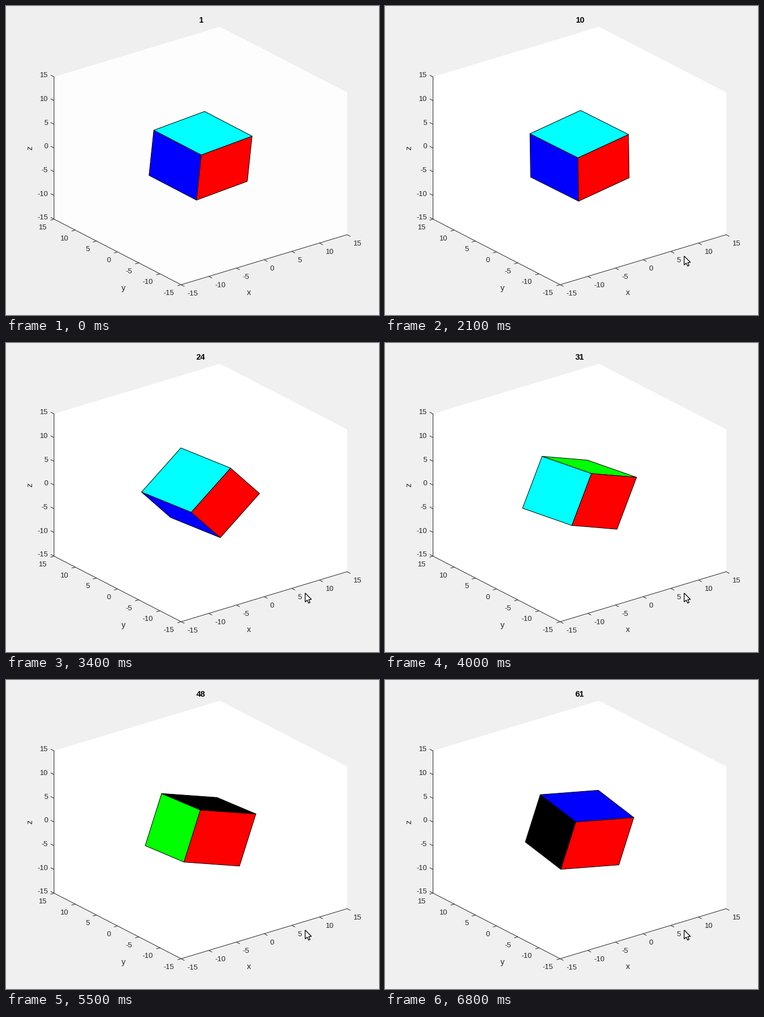
Animation, 672 px wide and 556 px high, one loop 6900 ms. Source, as a matplotlib script:

```python
from itertools import product

import numpy as np
import matplotlib.pyplot as plt
from matplotlib.animation import FuncAnimation
from matplotlib.patches import Polygon

W, H, DPI = 672, 556, 64
PX = 72 / DPI  # points per pixel
FRAMES, STEP = 69, 100
INK = "#262626"
LIM = 15

plt.rcParams["font.family"] = "Liberation Sans"

# Screen position of a 3D point: CENTER + PROJ @ point
CENTER = np.array([350.0, 269.0])
PROJ = np.array([[299, -229, 0], [-90, -118, -256]]) / (2 * LIM)
VIEW = np.cross(PROJ[1], PROJ[0])  # points towards the viewer
X, Y, Z = np.eye(3)

FACES = list(product(range(3), (-1, 1)))  # (axis, sign)
COLORS = "blue lime red yellow black cyan".split()


def project(p):
    return CENTER + PROJ @ p


def rotation(i, j, angle):
    """Turn axis i towards axis j."""
    m = np.eye(3)
    m[i, i] = m[j, j] = np.cos(angle)
    m[j, i] = np.sin(angle)
    m[i, j] = -m[j, i]
    return m


TILT = rotation(0, 1, 0.1) @ rotation(1, 2, 0.1)


def face_quad(rot, axis, sign, half):
    n, u, v = (rot[:, (axis + k) % 3] * half for k in range(3))
    turns = np.pi / 4 + np.arange(4) * np.pi / 2
    return [project(sign * n + np.sqrt(2) * (np.cos(t) * u + np.sin(t) * v))
            for t in turns]


fig = plt.figure(figsize=(W / DPI, H / DPI), dpi=DPI)
ax = fig.add_axes([0, 0, 1, 1])
ax.set_xlim(-0.5, W - 0.5)
ax.set_ylim(H - 0.5, -0.5)
ax.axis("off")


def line(p, q):
    ax.plot(*zip(p, q), color=INK, lw=PX, solid_capstyle="projecting",
            snap=False, zorder=2)


def label(x, y, s, size=13.33, ha="center", **kw):
    kw = {"color": INK, "va": "baseline", **kw}
    return ax.text(x, y, s, fontsize=size * PX, ha=ha, zorder=3, **kw)


def draw_axis(along, corner, outward, offset, ha):
    line(project(corner - LIM * along), project(corner + LIM * along))
    tick = PROJ @ outward
    tick *= 6.2 / np.hypot(*tick)
    for v in range(-LIM, LIM + 1, 5):
        p = project(corner + v * along)
        line(p, p + tick)
        label(*(p + offset), str(v), ha=ha)


room = [ax.add_patch(Polygon(face_quad(np.eye(3), *face, LIM), lw=0, zorder=1))
        for face in FACES]
draw_axis(X, -LIM * (Y + Z), -Y, (11, 19.8), "left")
draw_axis(Y, -LIM * (X + Z), -X, (-12.2, 18.5), "right")
draw_axis(Z, LIM * (Y - X), Y, (-11, 0.7), "right")
label(436.8, 519, "x", 14.67)
label(211.5, 511.5, "y", 14.67)
label(42.8, 255, "z", 14.67, va="center", rotation=90)
title = label(350.5, 30, "1", 14.67, color="black", weight="bold")

sides = [ax.add_patch(Polygon(np.zeros((4, 2)), fc=color, ec="black", lw=PX,
                              joinstyle="round", zorder=4))
         for color in COLORS]

ARROW = np.array([(0, 0), (0, 16), (3.7, 12.6), (6.2, 18), (8.8, 17),
                  (6.4, 11.6), (11.3, 11.4)])
cursor = ax.add_patch(Polygon(ARROW, fc="white", ec="black", lw=1.3 * PX,
                              joinstyle="miter", zorder=6))


def counter(f):
    # a slow start, then slightly faster than one count per frame
    if f < 15:
        return max(1, (f + 1) // 4)
    return int(np.interp(f, [15, 34, 55, 68], [4.4, 24.4, 48.1, 61.1]))


def place_cube(n):
    # constant angular acceleration about the y axis
    spin = 0.001261 * max(0, n - 1.15) ** 2
    rot = rotation(0, 2, spin) @ TILT
    for side, (axis, sign) in zip(sides, FACES):
        side.set_xy(face_quad(rot, axis, sign, 5))
        side.set_visible(sign * rot[:, axis] @ VIEW > 0)


def place_cursor(f):
    left = (1 - np.clip((f - 1) / 4, 0, 1)) ** 2
    cursor.set_xy(ARROW + (538.5 + 113.5 * left, 449.5 + 93.5 * left))
    cursor.set_visible(f > 0)


def update(f):
    n = counter(f)
    title.set_text(str(n))
    place_cube(n)
    place_cursor(f)
    settled = f >= 3
    fig.set_facecolor("#f0f0f0" if settled else "#efefef")
    for wall in room:
        wall.set_facecolor("#ffffff" if settled else "#fdfdfd")
    return [title, cursor, *room, *sides]


anim = FuncAnimation(fig, update, frames=FRAMES, interval=STEP,
                     repeat=True, repeat_delay=0, blit=False)
plt.show()
```
